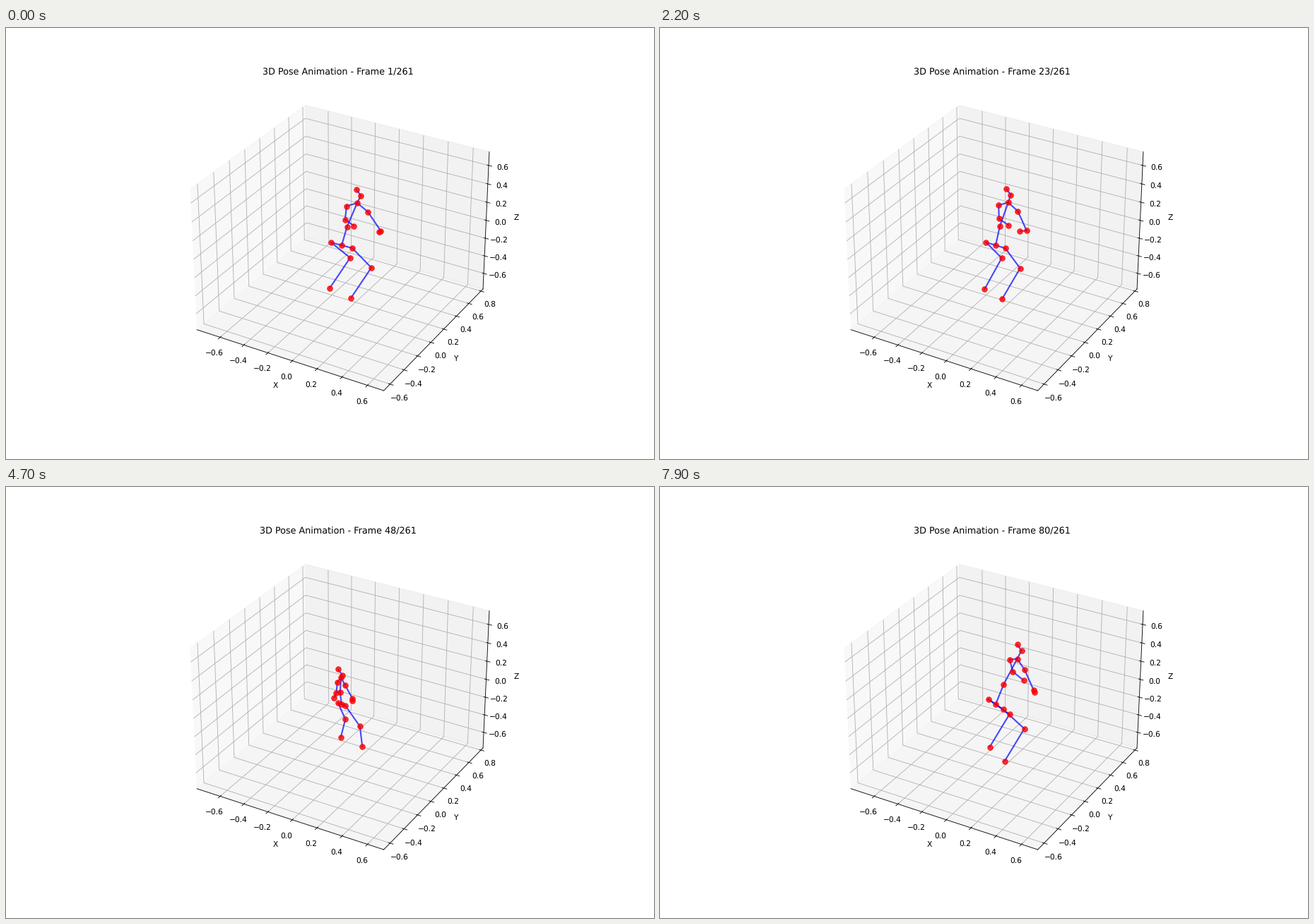
A matplotlib script that plays this animation: 917 by 611 pixels, repeating every 8000 ms.

```python
import numpy as np
import matplotlib.pyplot as plt
from matplotlib.animation import FuncAnimation
from matplotlib.collections import LineCollection

W, H = 917, 611
FRAMES, INTERVAL = 80, 100
DPI = W / 12
PELVIS = np.array([475, 308])

# The puppet's controls in stage pixels, eased from key to key
KEY_TIMES = [0, 1.5, 3, 3.9, 5.5, 6.9, 7.5]
CONTROLS = {
    "height": [60, 65, 56, 28, 48, 55.5, 64.5],  # pelvis to chest
    "lean": [22, 16, 20, -11, 9.5, -5, 30.5],    # chest offset in x
    "turn": [15, 15, 12, 1, 9.5, 1.5, 10.5],     # hip and shoulder half width
    "tilt": [4, 3, 5.7, 3, 1, 4.5, 7.2],         # the same in y
    "thigh": [27, 17, 27, 21, 10, -15, 30],
    "shin": [-29, -24, -26, -7, 4, -2, -28],
    "stride": [0, -2, 1, 7, 3, 10, 0],           # half gap between the legs
    "hands": [18, 3, 14, 0, 26, -2, 7],          # half gap between the wrists
}

# Joints: pelvis, spine, chest, neck, head, then each side's leg and arm
CHAINS = [(0, 1, 2, 3, 4), (0, 5, 6, 7), (2, 8, 9, 10),
          (0, 11, 12, 13), (2, 14, 15, 16)]
BONES = [pair for c in CHAINS for pair in zip(c, c[1:])]


def controls_at(t):
    k, u = divmod(np.interp(t, KEY_TIMES, range(len(KEY_TIMES))), 1)
    place = k + 0.5 * u + 0.5 * u * u * (3 - 2 * u)
    return {name: np.interp(place, range(len(keys)), keys)
            for name, keys in CONTROLS.items()}


def pose(height, lean, turn, tilt, thigh, shin, stride, hands):
    """Build all joints; arms and neck follow the swing of the thighs."""
    vec = lambda x, y: np.array([x, y])
    trunk = vec(lean, -height)
    chest = PELVIS + trunk
    neck = chest + vec(0.3 * thigh - 3, 0.32 * (28 - height))
    joints = [PELVIS, PELVIS + 0.44 * trunk - vec(2, 0), chest,
              neck, neck + vec(-6, -8.5)]

    shoulders = chest + vec(0, 8.5)
    elbows = shoulders + vec(0.3 * thigh, 0.25 * height + 8)
    wrists = elbows + vec(0.6 * thigh - 11, 5)
    girdle = vec(turn, tilt)
    for side in (-1, 1):
        hip = PELVIS + side * girdle
        knee = hip + vec(thigh, 28 - 0.12 * thigh) + side * vec(stride, 3)
        foot = knee + vec(shin, 0.72 * height) + side * stride * vec(1, 0.3)
        joints += [hip, knee, foot,
                   shoulders + side * girdle,
                   elbows + side * vec(1.2 * turn + 0.4 * hands, 2 * tilt),
                   wrists + side * vec(hands, tilt)]
    return np.array(joints)


plt.rcParams["text.hinting"] = "none"
fig = plt.figure(figsize=(12, 8), dpi=DPI)

ax = fig.add_subplot(111, projection="3d")
HALF = 0.7627
for name, mid in zip("xyz", (-0.036, 0.073, -0.017)):
    ax.set(**{f"{name}lim": (mid - HALF, mid + HALF),
              f"{name}label": name.upper()})

# Flat stage-pixel layer for the skeleton
stage = fig.add_axes([0, 0, 1, 1])
stage.axis("off")
bones = LineCollection([], colors="blue", linewidths=2, alpha=0.7,
                       capstyle="projecting", zorder=2)
stage.add_collection(bones, autolim=False)
dots = stage.scatter([], [], s=50, c="red", alpha=0.8, zorder=3)
stage.set(xlim=(0, W), ylim=(H, H - 8 * DPI))


def update(i):
    pts = pose(**controls_at(i * INTERVAL / 1000))
    bones.set_segments([pts[list(b)] for b in BONES])
    dots.set_offsets(pts)
    ax.set_title(f"3D Pose Animation - Frame {i + 1}/261")
    return bones, dots


anim = FuncAnimation(fig, update, frames=FRAMES, interval=INTERVAL,
                     repeat=True, repeat_delay=0)
plt.show()
```
